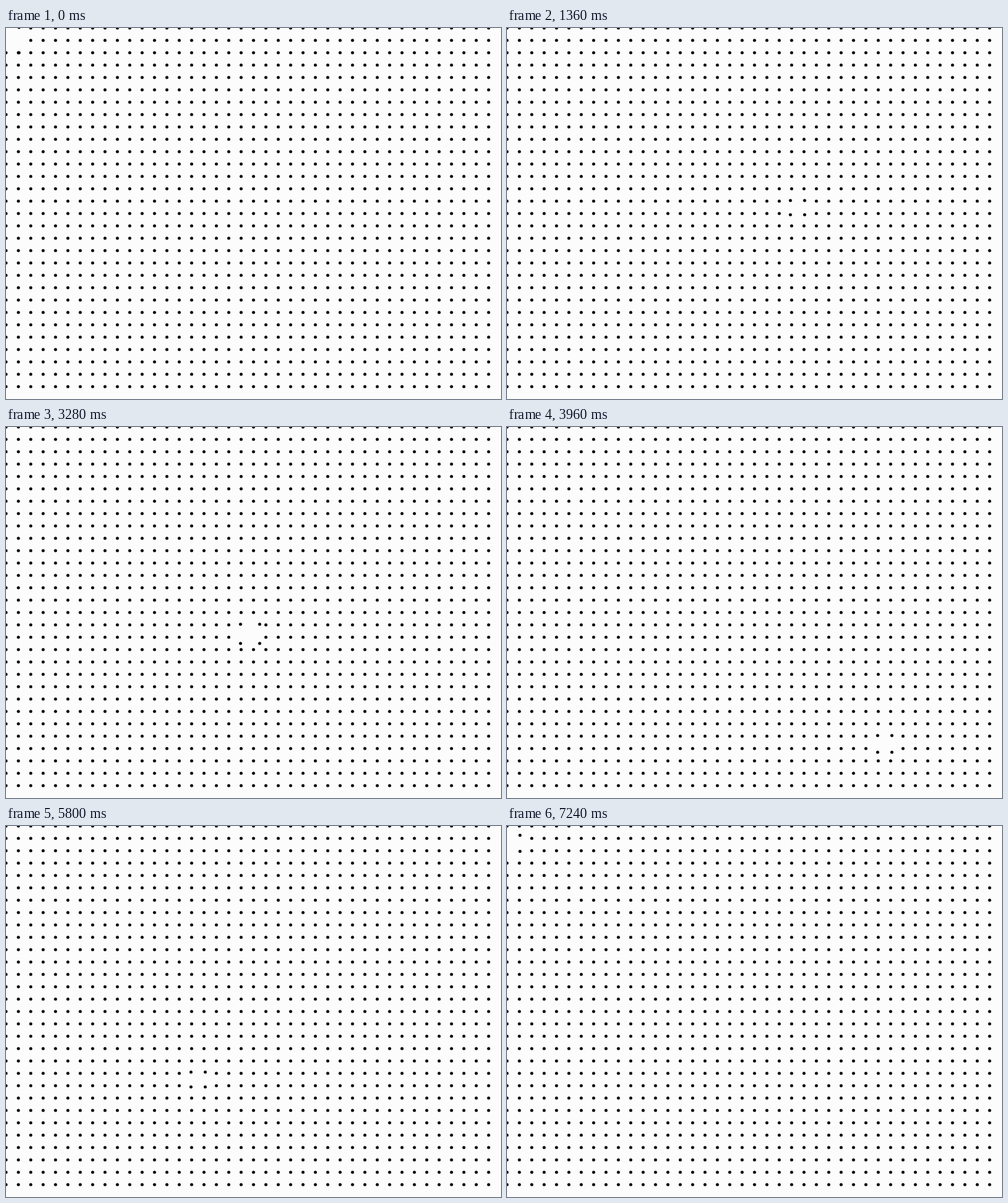
These frames come from a looping animation (800x600 px, 7.28 s). An HTML page with a canvas:

```html
<!DOCTYPE html>
<html lang="en">
<head>
<meta charset="utf-8">
<title>Dot grid</title>
<style>
  html, body { margin: 0; width: 100%; height: 100%; overflow: hidden; background: #fcfcfc; }
  canvas { display: block; }
</style>
</head>
<body>
<canvas id="stage" width="800" height="600"></canvas>
<script>
const ctx = document.getElementById('stage').getContext('2d');
const W = 800, H = 600, GAP = 20, RADIUS = 2.5, FORCE = 20;
const LOOP = 7280, STEP = 40;

// Turning points of the unseen pointer
const turns = [
  { t: 0, x: 1, y: 19 },
  { t: 760, x: 180, y: 275 },
  { t: 1080, x: 380, y: 411 },
  { t: 1240, x: 490, y: 365 },
  { t: 1360, x: 469, y: 291 },
  { t: 1720, x: 421, y: 328 },
  { t: 2280, x: 477, y: 385 },
  { t: 2640, x: 522, y: 339 },
  { t: 2960, x: 478, y: 258 },
  { t: 3320, x: 396, y: 350 },
  { t: 3800, x: 507, y: 492 },
  { t: 3960, x: 611, y: 517 },
  { t: 4200, x: 705, y: 545 },
  { t: 4600, x: 730, y: 470 },
  { t: 4840, x: 680, y: 169 },
  { t: 4960, x: 640, y: 106 },
  { t: 5320, x: 512, y: 150 },
  { t: 5800, x: 311, y: 410 },
  { t: 6080, x: 237, y: 459 },
  { t: 6200, x: 205, y: 471 },
  { t: 6840, x: 72, y: 185 },
  { t: 7240, x: 2, y: 24 }
];

// The turn with any index, repeated around the loop
function turn(i) {
  const n = turns.length, lap = Math.floor(i / n), p = turns[i - lap * n];
  return { ...p, t: p.t + lap * LOOP };
}

function slope(i, axis) {
  const a = turn(i - 1), b = turn(i), c = turn(i + 1);
  const before = (b[axis] - a[axis]) / (b.t - a.t);
  const after = (c[axis] - b[axis]) / (c.t - b.t);
  return before * after > 0 ? 2 * before * after / (before + after) : 0;
}

// Cubic curve that never overshoots its turns
function pointerAt(t) {
  const i = turns.findLastIndex(p => p.t <= t);
  const a = turn(i), b = turn(i + 1);
  const span = b.t - a.t, u = (t - a.t) / span, v = 1 - u;
  return ['x', 'y'].map(k => Math.round(
    v * v * (1 + 2 * u) * a[k] + u * u * (3 - 2 * u) * b[k] +
    span * u * v * (v * slope(i, k) - u * slope(i + 1, k))
  ));
}

function drawDot(x, y) {
  ctx.beginPath();
  ctx.arc(x, y, RADIUS, 0, Math.PI * 2);
  ctx.fill();
}

const push = d => Math.trunc(FORCE / d);
const near = d => d !== 0 && Math.abs(d) <= GAP;

function draw(t) {
  const [mx, my] = pointerAt(t);
  ctx.fillStyle = '#fcfcfc';
  ctx.fillRect(0, 0, W, H);
  ctx.fillStyle = '#000';
  for (let x = 0; x < W; x += GAP) {
    for (let y = 0; y < H; y += GAP) {
      const dx = x - mx, dy = y - my;
      if (near(dx) && near(dy)) drawDot(x + push(dx), y + push(dy));
      else drawDot(x, y);
    }
  }
}

const start = performance.now();
function tick() {
  const t = (performance.now() - start) % LOOP;
  draw(Math.floor(t / STEP) * STEP);
  requestAnimationFrame(tick);
}
tick();
</script>
</body>
</html>
```
